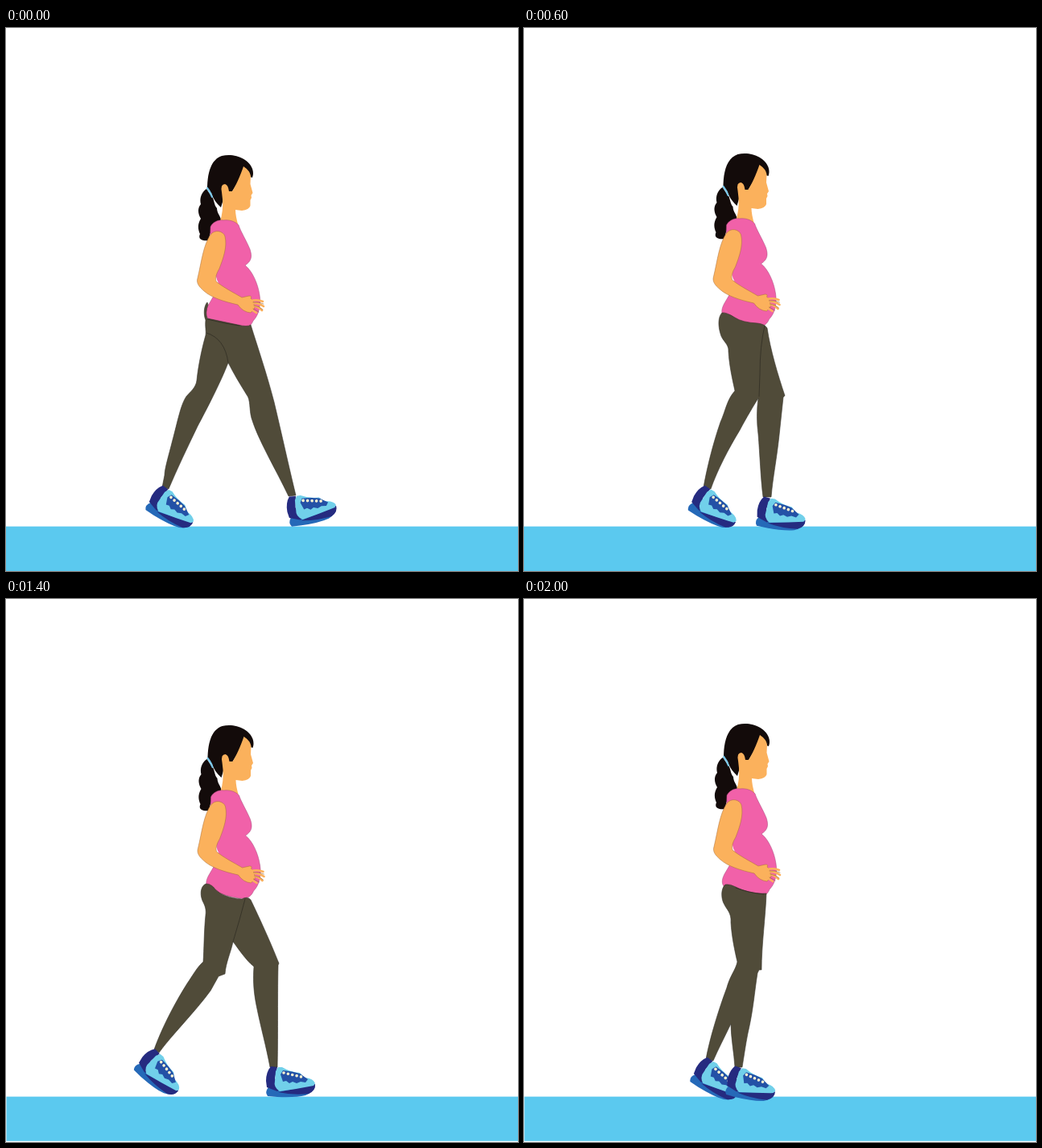
These frames come from a looping animation (636x675 px, 2.6 s). An HTML page:

```html
<!DOCTYPE html>
<html lang="en">
<head>
<meta charset="utf-8">
<title>Walking</title>
<style>
  html, body { margin: 0; width: 100%; height: 100%; overflow: hidden; background: #fff; }
  svg { display: block; width: 636px; height: 675px; }
  .skin { fill: #fbb15c; }
  .hair { fill: #130b0a; }
  .navy { fill: #252b80; }
  .blue { fill: #2569b8; }
  .cyan { fill: #71d0ea; }
  .line { fill: none; stroke-linecap: round; stroke-linejoin: round; }
</style>
</head>
<body>
<svg viewBox="0 0 636 675">
  <defs>
    <g id="shoe">
      <path class="blue" d="M-6 25Q-11 31 -7 36L5 37Q28 38 40 35Q50 31 51 24Z"/>
      <path class="navy" d="M6 31Q28 27 52 21Q53 29 44 33Q24 35 6 31Z"/>
      <path class="navy" d="M-3 -1Q-9 6 -9 17L-8 25L5 30L9 27L2 14L5 0Z"/>
      <path class="cyan" d="M3 5L6 0L11 0Q21 6 33 7L39 13Q50 14 52 20L50 23Q30 27 8 30Q0 25 2 17Z"/>
      <path d="M9 9L12 4Q24 5 33 8L43 15L40 19L34 18L29 20L24 18L20 20L16 17L12 18Z" fill="#2451a6"/>
      <path class="line" d="M13 7L35 12" stroke="#fff3d2" stroke-width="3.6" stroke-dasharray="0 5.5"/>
    </g>
  </defs>

  <rect id="floor" fill="#5bc9ef"/>

  <g id="body">
    <path class="hair" d="M249 200C243 204 240 212 242 219C237 225 239 232 242 237C237 245 239 252 241 256C238 263 244 265 252 264C252 258 255 252 257 247L267 241C268 235 262 231 262 224C258 220 259 212 255 209Z"/>
    <path class="hair" d="M250 201C250 181 254 164 268 159C284 155 302 163 306 175Q308 181 306 186L294 182L281 203L270 213L267 223Q258 215 255 205Z"/>
    <path class="line" d="M250 199Q254 204 256 210" stroke="#78c7ea" stroke-width="2.2"/>
    <path class="skin" d="M295 172C299 175 303 178 304 184L303.500 194L306.500 205L304.500 208L305 211L303.500 214L303.500 221Q302 226 293 227L285 226Q285 234 289 247L278 250L266 240Q270 228 269 213L268 204Q266 194 272 194Q276 195 277 203L281 203C285 197 291 184 295 172Z"/>
    <path d="M254 247C257 241 264 238 270 239C277 238 284 240 289 245C291 252 299 265 303 275C306 284 305 290 297 295C306 302 313 318 315 332C317 345 314 357 307 364C304 372 297 374 290 373C272 370 262 366 251 361C246 356 249 349 251 345L258 333C262 322 258 300 253 280Z" fill="#f161a9" stroke="#a34778" stroke-width=".5"/>
    <path d="M262 299Q258 308 260 315L264 317Q259 309 262 299Z" fill="#fff"/>
    <path class="skin" d="M254 257C259 250 270 252 272 259C275 272 270 286 265 299Q259 309 261 315C269 322 283 329 293 335L302 333Q306 333 304 336L307 339L309 348L304 354Q294 353 288 344C270 340 255 335 246 327C240 322 236 317 238 311C243 290 245 270 254 257Z" stroke="#a66d38" stroke-width=".5"/>
    <path class="line" d="M304 339Q313 337 319 340M305 342Q313 341 320 346M304 345Q312 345 318 351M303 349L311 354" stroke="#fbb15c" stroke-width="2.6"/>
    <path class="line" d="M307 341Q314 340 320 343M308 345Q315 346 319 350M307 349L314 353" stroke="#94603c" stroke-width=".6"/>
  </g>

  <path id="legs" fill="#504b39" stroke="#37332a" stroke-width=".6"/>
  <path id="crease" class="line" stroke="#2d2a21" stroke-width=".7"/>
  <use id="back" href="#shoe"/>
  <use id="front" href="#shoe"/>
</svg>

<script>
// Shoes: ankle x, ankle y, rotation in degrees.
const poses = [
  {
    until: 600, low: true, body: [0, 0], back: [197, 571, 29], front: [355, 583, -11],
    legs: "M250 341C246 345 245 356 248 363C247 371 249 377 248 382C244 396 239 418 237 438C236 447 229 452 224 458C217 468 213 490 207 512C202 532 197 548 197 556L194 571L202 573C213 547 226 520 238 495C247 478 267 440 276 416C283 430 291 443 299 456C304 462 302 474 305 485C313 512 336 550 351 582L360 581C351 544 343 507 333 465C324 430 312 395 304 369Q300 372 288 369L250 361Q247 354 251 344Z",
    crease: "M249 379Q272 386 276 416M250 362L272 367L290 370"
  },
  {
    until: 1400, low: true, body: [-2.5, -2], back: [227, 571, 28], front: [301, 584, 8],
    legs: "M246 354C241 359 241 370 244 380C246 389 255 393 254 402C255 420 259 437 262 451C252 462 251 474 244 490C236 513 228 543 223 571L232 573C240 550 254 523 268 500C277 483 285 470 291 460C289 475 289 490 291 505C293 530 294 560 297 583L307 583C309 559 314 535 317 506L322 459L324 457C315 430 306 400 302 373Q299 368 290 367Q271 366 262 360Q251 353 246 354Z",
    crease: "M299 370Q293 395 293 430L292 458"
  },
  {
    until: 2000, low: false, body: [.5, -1], back: [187, 562, 39], front: [332, 582, 0],
    legs: "M249 354C243 355 240 365 244 375C247 381 249 385 248 393C246 412 246 437 245 451C237 458 232 468 225 478C208 505 193 535 184 560L190 564C205 543 236 512 254 487L264 469L272 466C273 452 279 440 282 426C289 435 297 448 308 457C307 470 307 485 311 505C317 535 323 555 328 582L337 582C338 550 337 500 338 455L339 453C328 425 314 395 304 374Q300 369 293 373Q270 371 260 361Q255 354 249 354Z",
    crease: "M297 373Q290 400 282 426"
  },
  {
    until: 2600, low: false, body: [-2, -3], back: [230, 572, 29], front: [265, 582, 11],
    legs: "M250 355C245 359 244 372 249 380C251 385 258 390 257 402C258 420 262 438 265 451C263 461 256 468 252 483C242 510 231 545 226 572L235 574C241 560 249 545 257 528C257 545 261 565 262 582L271 582C273 570 275 555 278 540C285 510 286 490 290 465L292 461L295 461C295 430 300 395 301 366C288 367 273 363 263 358Q256 354 250 355Z",
    crease: "M263 359Q278 365 298 367"
  }
];

const el = id => document.getElementById(id);
const set = (id, attrs) => {
  for (const name in attrs) el(id).setAttribute(name, attrs[name]);
};
const placeShoe = (id, [x, y, angle]) =>
  set(id, { transform: `translate(${x} ${y}) rotate(${angle})` });

let shown;
function draw() {
  const time = performance.now() % 2600;
  const pose = poses.find(p => time < p.until);
  if (pose !== shown) {
    shown = pose;
    set("floor", pose.low
      ? { x: 0, y: 619.6, width: 636, height: 56 }
      : { x: .5, y: 618.6, width: 636, height: 55.2 });
    set("body", { transform: `translate(${pose.body})` });
    set("legs", { d: pose.legs });
    set("crease", { d: pose.crease });
    placeShoe("back", pose.back);
    placeShoe("front", pose.front);
  }
  requestAnimationFrame(draw);
}
draw();
</script>
</body>
</html>
```
